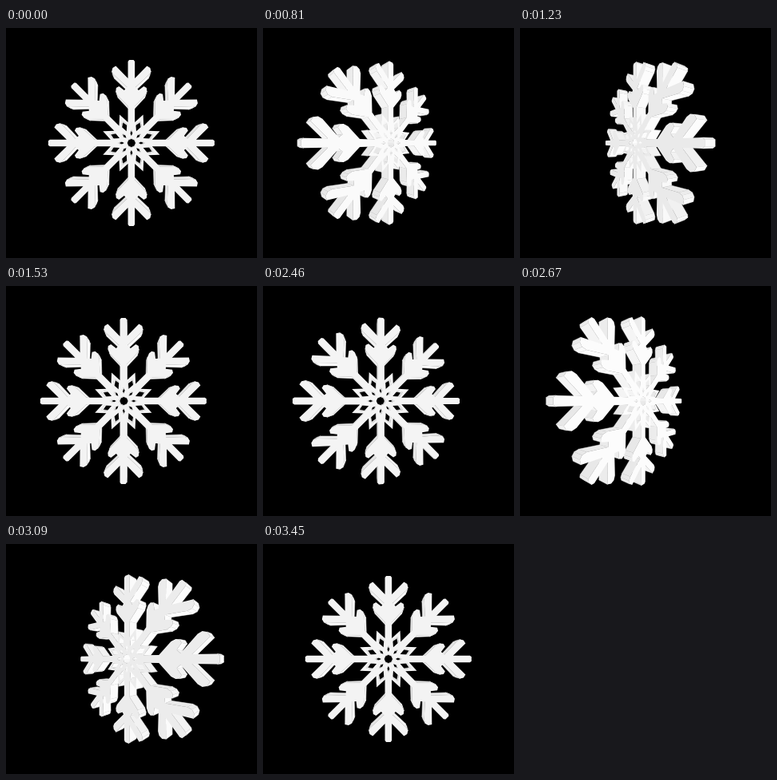
Write an HTML page with a canvas that moves like this. It is 314x288 px and loops after 3480 ms.

```html
<!DOCTYPE html>
<html>
<head>
<meta charset="utf-8">
<style>
html, body { margin: 0; background: #000; overflow: hidden; }
canvas { display: block; }
</style>
</head>
<body>
<canvas width="314" height="288"></canvas>
<script>
const ctx = document.querySelector('canvas').getContext('2d');
const LOOP = 3480, CAMERA = 203, CAM_X = 5, HUB = 4.85, HALF = 6.7, SIZE = 0.967;

// [distance along arm, half width]
const armSide = [[26, 4.3], [46, 4.3], [60, 17.5], [65, 19.5], [69, 19], [71, 15.5], [66, 9], [70, 5.5],
  [86, 22.5], [90, 24.5], [94, 23.5], [96.5, 19.5], [81, 4.3], [102, 4.3], [104, 2.8]];
const mirror = side => side.map(([r, s]) => [r, -s]);
const arm = [...mirror(armSide), ...armSide.slice().reverse()];
const petalHole = [[30, 0], [24, -4], [16, 0], [24, 4]];
const slitHole = [[17, 0], [13, -1.9], [9, 0], [13, 1.9]];

const place = (points, angle) => points.map(([r, s]) => [
  HUB + SIZE * (r * Math.cos(angle) - s * Math.sin(angle)),
  SIZE * (r * Math.sin(angle) + s * Math.cos(angle))]);

const outline = [], center = [], contours = [outline];
for (let i = 0; i < 8; i++) {
  const angle = i * Math.PI / 4, between = angle + Math.PI / 8;
  outline.push(...place(arm, angle), ...place([[38.5, 0]], between));
  center.unshift(...place([[5.8, 0]], angle));
  contours.push(place(petalHole, between), place(slitHole, angle));
}
contours.push(center);

const walls = contours.flatMap(c => c.map((p, i) => {
  const q = c[(i + 1) % c.length], dx = q[0] - p[0], dy = q[1] - p[1], len = Math.hypot(dx, dy);
  return { p, q, nx: dy / len, ny: -dx / len, mx: (p[0] + q[0]) / 2, my: (p[1] + q[1]) / 2 };
}));

const progress = (t, from, to) => Math.min(1, Math.max(0, (t - from) / (to - from)));

function shade(nx, ny) {
  const v = Math.min(252, Math.round(243 + 11 * nx + 9 * ny));
  return `rgb(${v},${v},${v})`;
}

function draw(t) {
  const turn = Math.PI * (progress(t, 604, 1509) + progress(t, 2430, 3285));
  const cos = Math.cos(turn), sin = Math.sin(turn);
  const project = ([u, v], w) => {
    const k = CAMERA / (CAMERA + u * sin - w * cos);
    return [157 + (u * cos + w * sin - CAM_X) * k, 144 + v * k];
  };
  const trace = points => {
    points.forEach(([x, y], i) => i ? ctx.lineTo(x, y) : ctx.moveTo(x, y));
    ctx.closePath();
  };

  ctx.fillStyle = '#000';
  ctx.fillRect(0, 0, 314, 288);
  ctx.lineWidth = 0.5;
  ctx.lineJoin = 'round';

  // camera position in the flake's own space
  const camU = CAM_X * cos - CAMERA * sin, camW = CAM_X * sin + CAMERA * cos;
  const depth = wall => Math.hypot(wall.mx - camU, wall.my);
  walls
    .filter(({ p, nx, ny }) => nx * (camU - p[0]) - ny * p[1] > 0)
    .sort((a, b) => depth(b) - depth(a))
    .forEach(({ p, q, nx, ny }) => {
      ctx.fillStyle = ctx.strokeStyle = shade(nx * cos, ny);
      ctx.beginPath();
      trace([project(p, HALF), project(q, HALF), project(q, -HALF), project(p, -HALF)]);
      ctx.fill();
      ctx.stroke();
    });

  if (Math.abs(camW) > HALF) {
    const side = Math.sign(camW);
    ctx.fillStyle = shade(side * sin, 0);
    ctx.beginPath();
    contours.forEach(c => trace(c.map(p => project(p, side * HALF))));
    ctx.fill('evenodd');
  }
}

function frame() {
  draw(performance.now() % LOOP);
  requestAnimationFrame(frame);
}
frame();
</script>
</body>
</html>
```
